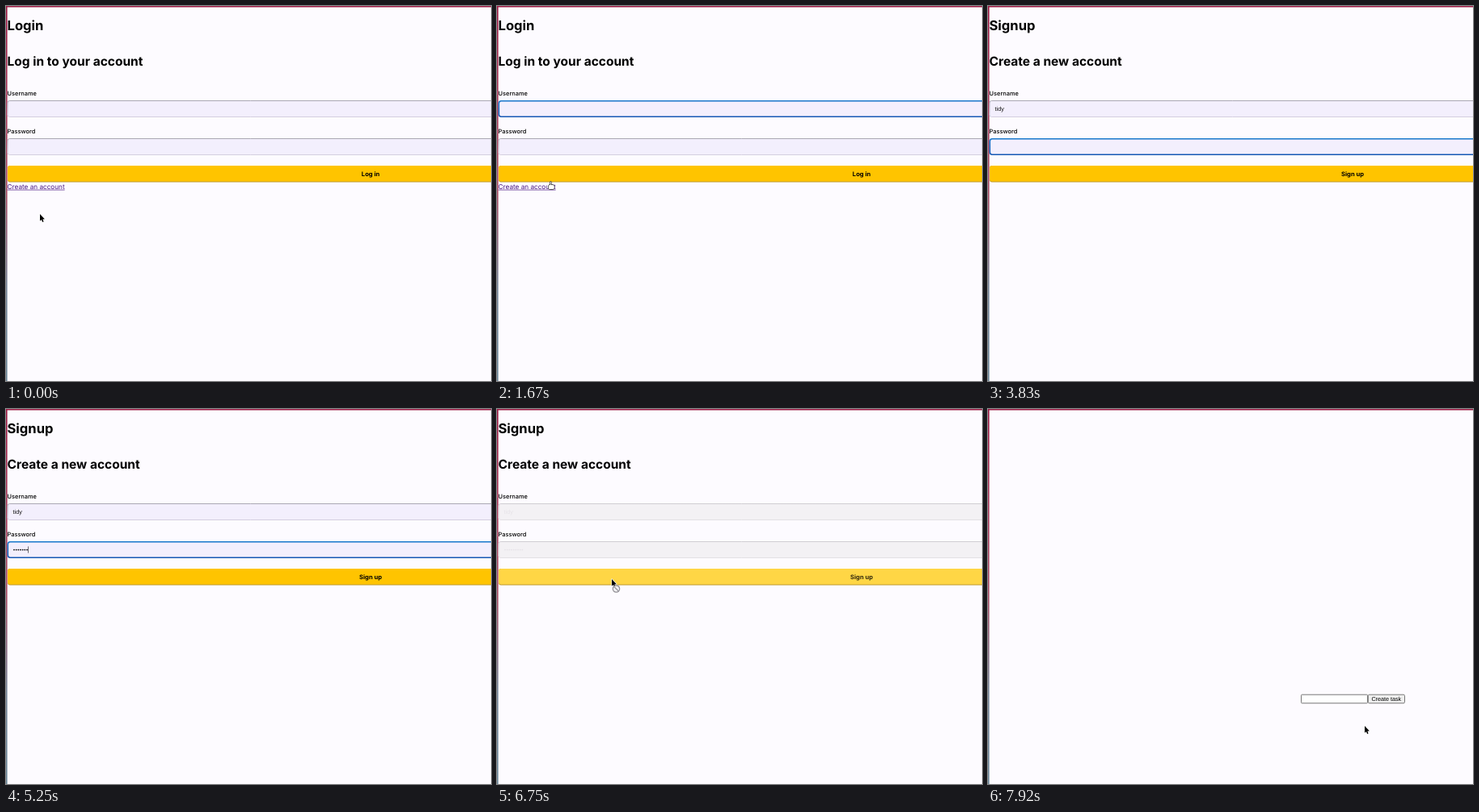
Recreate the animation shown at these times as an HTML page with a canvas. Size 600 by 465 pixels, loop 8 s.

```html
<!DOCTYPE html>
<html lang="en">
<head>
<meta charset="utf-8">
<title>Login and signup</title>
<style>
  html, body { margin: 0; width: 100%; height: 100%; overflow: hidden; background: #fdfbff; }
  canvas { display: block; width: 600px; height: 465px; }
</style>
</head>
<body>
<canvas id="stage" width="600" height="465"></canvas>
<script>
const ctx = document.getElementById('stage').getContext('2d');
const LOOP = 8000, STEP = 1000 / 12;
const SANS = 'Inter, Roboto, sans-serif';
const ARIAL = '"Liberation Sans", Arial, sans-serif';
const PAGE_W = 902, DOT = 2.67;

const SIGNUP = 1745, DISABLED = 6745, TASKS = 6910;
const USER_FOCUS = 2075, PASS_FOCUS = 3245, MOUSE_BACK = 5910;
const USER = { text: 'tidy', start: 2575, gap: 140 };
const PASS = { text: '•'.repeat(9), start: 3910, gap: 208 };

// pointer moves: from, to, x, y
const MOVES = [
  [0, 170, 58, 229],
  [250, 750, 85, 128],
  [920, 1230, 66.5, 219.5],
  [SIGNUP, 2250, 90, 127.5],
  [MOUSE_BACK, 6170, 142, 211],
  [7250, 7500, 275, 258],
  [7590, 7750, 477, 399],
  [7840, 7910, 466, 393]
];

const clamp = v => Math.max(0, Math.min(1, v));
const mix = (a, b, k) => a + (b - a) * k;
const easeOut = k => 1 - (1 - k) ** 2;
const within = (v, a, b) => v > a && v < b;

function pointerAt(t) {
  let x = 42, y = 258;
  for (const [from, to, tx, ty] of MOVES) {
    const k = easeOut(clamp((t - from) / (to - from)));
    x = mix(x, tx, k);
    y = mix(y, ty, k);
  }
  return [x, y];
}

const typed = ({ text, start, gap }, t) =>
  text.slice(0, Math.max(0, Math.floor((t - start) / gap) + 1));

const lastKey = ({ text, start, gap }, t) =>
  t < start ? 0 : start + gap * Math.min(text.length - 1, Math.floor((t - start) / gap));

function focusAt(t) {
  if (within(t, 745, SIGNUP)) return ['user', 745];
  if (within(t, USER_FOCUS, PASS_FOCUS)) return ['user', USER_FOCUS];
  if (within(t, PASS_FOCUS, DISABLED)) return ['pass', PASS_FOCUS];
  return ['', 0];
}

// the hover colour fades: share of the last moments spent over the button
function hoverAt(t) {
  const n = 12, span = 120;
  let over = 0;
  for (let i = 0; i < n; i++) over += within(pointerAt(t - i * span / n)[1], 198, 219);
  return over / n;
}

function text(str, x, y, font, color = '#000', align = 'left') {
  ctx.font = font;
  ctx.fillStyle = color;
  ctx.textAlign = align;
  ctx.fillText(str, x, y);
}

function box(x, y, w, h, r, fill, stroke, line = 1) {
  ctx.beginPath();
  ctx.roundRect(x, y, w, h, r);
  ctx.fillStyle = fill;
  ctx.fill();
  if (!stroke) return;
  ctx.strokeStyle = stroke;
  ctx.lineWidth = line;
  ctx.stroke();
}

function shape(points, fill, stroke, line) {
  ctx.beginPath();
  points.forEach(([x, y]) => ctx.lineTo(x, y));
  ctx.closePath();
  ctx.lineJoin = 'round';
  ctx.strokeStyle = stroke;
  ctx.lineWidth = line;
  ctx.stroke();
  ctx.fillStyle = fill;
  ctx.fill();
}

function vertical(y, h, ...stops) {
  const g = ctx.createLinearGradient(0, y, 0, y + h);
  stops.forEach((c, i) => g.addColorStop(i / (stops.length - 1), c));
  return g;
}

function background() {
  ctx.fillStyle = '#fdfbff';
  ctx.fillRect(0, 0, 600, 465);
  ctx.fillStyle = vertical(0, 465, '#9c1c45', '#a83c5c', '#a85068', '#78879a', '#6c8799');
  ctx.fillRect(0, 0, 1.6, 465);
  ctx.fillStyle = '#9c1c45';
  ctx.fillRect(0, 0, 600, 1.5);
}

function field(y, focused, disabled) {
  const w = PAGE_W - 4;
  if (focused) box(2.3, y + 0.8, w, 19.5, 3, '#f3effd', vertical(y, 20, '#1878cc', '#1558b4'), 1.6);
  else if (disabled) box(2, y + 0.5, w, 20, 2.5, '#f3f1f4', vertical(y, 20, '#cfcdd2', '#e2e0e4'));
  else box(2, y + 0.5, w, 20, 2.5, '#f3effd', vertical(y, 20, '#a9a7b2', '#d4cfdf'));
}

function button(label, hover, disabled) {
  const k = disabled ? 1.5 : hover;
  const fill = `rgb(255,${Math.round(196 + 12 * k)},${Math.round(46 * k)})`;
  box(2, 198, PAGE_W - 4, 20.5, 3, '#c09c30');
  box(2, 198, PAGE_W - 4, 19.6, 3, fill);
  text(label, PAGE_W / 2, 211, `700 7.6px ${SANS}`, disabled ? '#33290c' : '#000', 'center');
}

function form(t) {
  const signup = t >= SIGNUP, disabled = t >= DISABLED;
  const [focus, since] = focusAt(t);

  text(signup ? 'Signup' : 'Login', 1.5, 29.8, `700 16.6px ${SANS}`);
  text(signup ? 'Create a new account' : 'Log in to your account', 1.5, 74.3, `700 15.5px ${SANS}`);
  text('Username', 1.6, 111.3, `500 7.4px ${SANS}`);
  text('Password', 1.6, 158.3, `500 7.4px ${SANS}`);
  field(117, focus === 'user', disabled);
  field(164, focus === 'pass', disabled);

  const ink = disabled ? '#e6e3e8' : '#111';
  const name = typed(USER, t), dots = typed(PASS, t).length;
  text(name, 8.6, 130.3, `7.3px ${ARIAL}`, ink);
  const nameW = ctx.measureText(name).width;
  for (let i = 0; i < dots; i++) {
    ctx.beginPath();
    ctx.arc(10 + i * DOT, 174.6, 0.95, 0, 7);
    ctx.fill();
  }

  // the caret blink restarts with every key
  const last = Math.max(since, lastKey(USER, t), lastKey(PASS, t));
  if (focus && (t - last) % 1000 < 500) {
    ctx.fillStyle = '#4c4a55';
    if (focus === 'user') ctx.fillRect(8.5 + nameW, 123.4, 0.8, 8.2);
    else ctx.fillRect(8.5 + dots * DOT, 170.4, 0.8, 8.2);
  }

  button(signup ? 'Sign up' : 'Log in', hoverAt(t), disabled);
  if (!signup) {
    const link = 'Create an account';
    text(link, 1.6, 226.6, `8.2px ${SANS}`, '#4d1a86');
    ctx.fillRect(1.6, 227.7, ctx.measureText(link).width, 0.7);
  }
}

function tasks() {
  box(387.5, 354.2, 82, 10.6, 1, '#fff', '#777');
  box(470.3, 354.2, 45.2, 10.6, 1.5, '#efefef', '#777');
  text('Create task', 492.8, 362, `7.2px ${ARIAL}`, '#000', 'center');
}

function arrow() {
  shape([[0, 0], [0, 8.6], [1.9, 6.9], [3.2, 9.9], [4.6, 9.3], [3.3, 6.4], [5.9, 6.2]], '#000', '#fff', 1.2);
}

function beam() {
  ctx.strokeStyle = '#222';
  ctx.lineWidth = 0.8;
  ctx.beginPath();
  for (const end of [-3.8, 3.8]) {
    ctx.moveTo(-1.7, end);
    ctx.lineTo(1.7, end);
  }
  ctx.moveTo(0, -3.8);
  ctx.lineTo(0, 3.8);
  ctx.stroke();
}

function hand() {
  box(-3, 2, 7.4, 6, 2, '#fff', '#111', 0.7);
  box(-0.9, -2, 1.7, 6, 0.8, '#fff', '#111', 0.7);
  box(-2.6, 2.6, 6.6, 5, 1.6, '#fff');
}

function blocked() {
  arrow();
  ctx.beginPath();
  ctx.arc(5.5, 12, 4.2, 0, 7);
  ctx.fillStyle = '#f1f0f2';
  ctx.fill();
  ctx.moveTo(2.6, 9.1);
  ctx.lineTo(8.4, 14.9);
  ctx.strokeStyle = '#929096';
  ctx.lineWidth = 1.2;
  ctx.stroke();
}

function pointer(t) {
  if (within(t, USER.start, MOUSE_BACK)) return;
  const [x, y] = pointerAt(t);
  let draw = arrow;
  if (t < TASKS) {
    if (t >= DISABLED) draw = blocked;
    else if (within(y, 117, 138) || within(y, 164, 185)) draw = beam;
    else if (t < SIGNUP && x < 73 && within(y, 219, 228)) draw = hand;
  }
  ctx.save();
  ctx.translate(x, y);
  draw();
  ctx.restore();
}

function render(now) {
  const t = Math.floor((now % LOOP + 4) / STEP) * STEP % LOOP;
  background();
  if (t < TASKS) form(t);
  else tasks();
  pointer(t);
}

ctx.textRendering = 'geometricPrecision';
const start = performance.now();
function tick() {
  render(performance.now() - start);
  requestAnimationFrame(tick);
}
tick();
</script>
</body>
</html>
```
